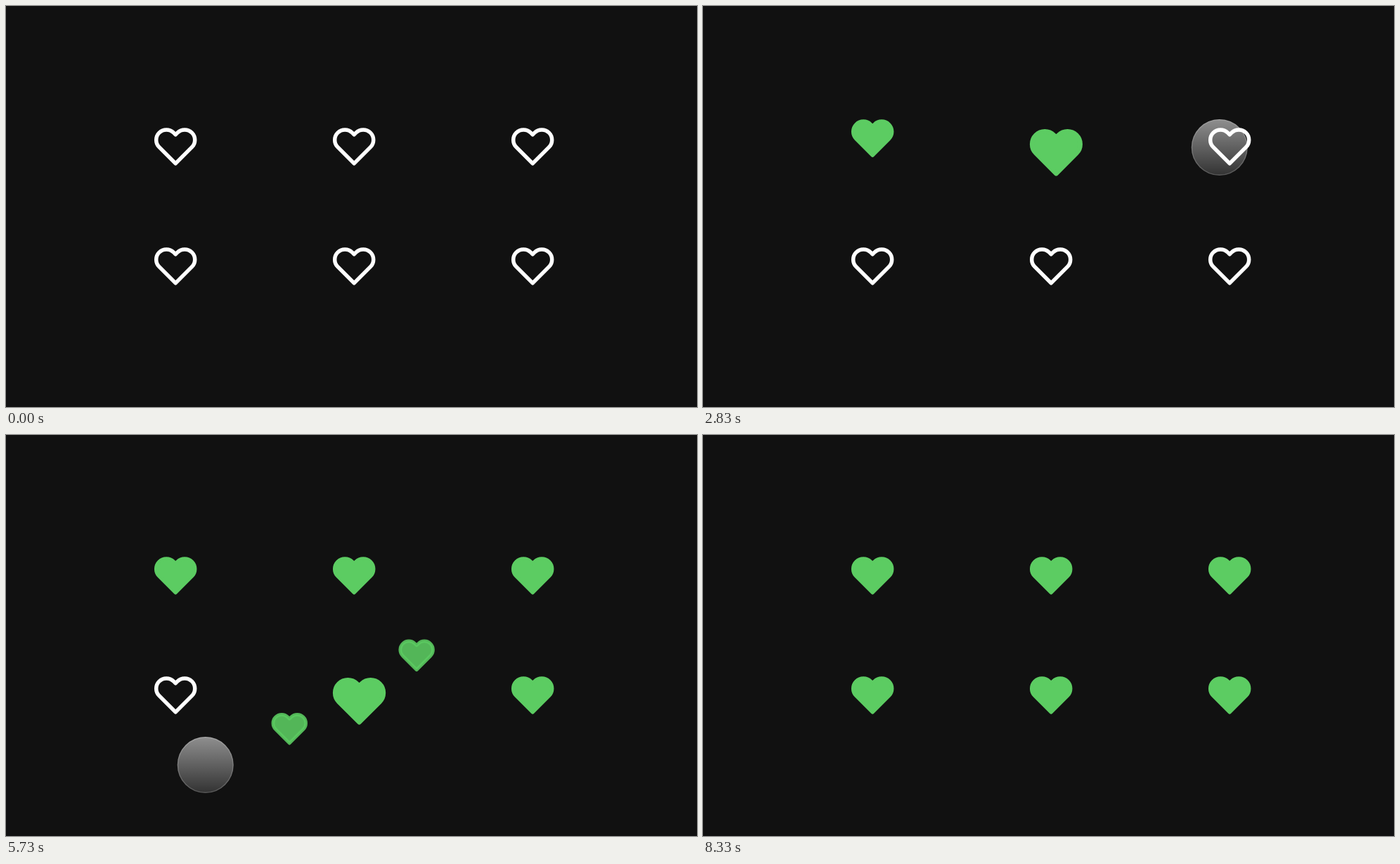
An HTML page with a canvas that plays this animation: 983 px wide and 570 px high, repeating every 8360 ms.

```html
<!DOCTYPE html>
<html lang="en">
<head>
<meta charset="utf-8">
<title>Hearts</title>
<style>
  html, body { margin: 0; width: 100%; height: 100%; overflow: hidden; background: #111; }
  canvas { display: block; }
</style>
</head>
<body>
<canvas id="stage" width="983" height="570"></canvas>
<script>
const ctx = document.getElementById('stage').getContext('2d');
const LOOP = 8360;
const FADE = 400;
const GREEN = [92, 204, 98];
const LOBE = 14.5;
const STROKE = 5.5;
// Transforms pivot on the top left corner of each heart's box.
const PIVOT = { x: -30, y: -35 };

// Two round lobes joined by 45 degree lines.
const heartPath = new Path2D();
heartPath.arc(-13, -10, LOBE, Math.PI * 0.75, Math.PI * 1.75);
heartPath.lineTo(0, -17.5);
heartPath.arc(13, -10, LOBE, Math.PI * 1.25, Math.PI * 0.25);
heartPath.lineTo(0, 23.5);
heartPath.closePath();

const clamp = v => Math.min(1, Math.max(0, v));
const rad = deg => deg * Math.PI / 180;
const glide = p => p < 0.5 ? 4 * p ** 3 : 1 - 4 * (1 - p) ** 3;
const curve = (a, b, c, u) => (1 - u) ** 2 * a + 2 * u * (1 - u) * b + u * u * c;

// The CSS "ease" curve, cubic-bezier(.25, .1, .25, 1).
function ease(p) {
  const bezier = (b, c, u) => 3 * (1 - u) ** 2 * u * b + 3 * (1 - u) * u * u * c + u ** 3;
  let lo = 0, hi = 1;
  for (let i = 0; i < 20; i++) {
    const mid = (lo + hi) / 2;
    if (bezier(0.25, 0.25, mid) < clamp(p)) lo = mid; else hi = mid;
  }
  return bezier(0.1, 1, lo);
}

// Out and back, each half eased.
const swing = (age, half = 1000) => age < half ? ease(age / half) : 1 - ease(age / half - 1);

const grow = k => ctx.scale(k, k);
const hop = age => ctx.translate(0, -30 * swing(age));
const swell = age => grow(1 + 0.3 * swing(age));
const tilt = age => ctx.rotate(rad(30 * swing(age)));
const split = age => grow(1 + 0.365 * swing(age));
const skew = age => ctx.transform(1, 0, Math.tan(rad(20 * swing(age, 700))), 1, 0, 0);
function flip(age) {
  const angle = rad(360 * ease(age / 1000));
  ctx.scale(1 - 0.035 * Math.sin(angle), Math.cos(angle));
}

// In tap order: along the top row, then back along the bottom one.
// After each tap the pointer travels on; bend moves the curve's handle off its end.
const hearts = [
  { tap: 1480, move: hop, travel: 570, bend: [-127, -72] },
  { tap: 2330, move: swell, travel: 650, bend: [-127, -44] },
  { tap: 3300, move: tilt, travel: 1200, bend: [105, 130] },
  { tap: 4534, move: flip, travel: 572, bend: [0, 193] },
  { tap: 5340, move: split, travel: 740, bend: [0, 193] },
  { tap: 6750, move: skew, travel: 1150, bend: [0, 378] }
];
hearts.forEach((heart, i) => {
  heart.x = 241.2 + 254 * (i < 3 ? i : 5 - i);
  heart.y = i < 3 ? 200.4 : 370.4;
});

const entry = { tap: 570, travel: 750, bend: [200, 0], at: [794, 285] };
const exit = { at: [83, 212] };
const stops = [entry, ...hearts.map(h => ({ ...h, at: [h.x - 2.2, h.y + 4.6] })), exit];

function paintHeart(fillAlpha, strokeColor) {
  ctx.lineWidth = STROKE;
  ctx.lineJoin = 'round';
  ctx.fillStyle = `rgba(${GREEN},${fillAlpha})`;
  ctx.strokeStyle = strokeColor;
  ctx.fill(heartPath);
  ctx.stroke(heartPath);
}

function drawTwins(age) {
  const reach = 156 * swing(age);
  const alpha = ease((age - 150) / FADE);
  for (const side of [-1, 1]) {
    ctx.save();
    ctx.translate(493.7 + side * reach * Math.cos(rad(30)), 366 - side * reach * Math.sin(rad(30)));
    grow(0.85);
    paintHeart(alpha, `rgba(${GREEN},${alpha})`);
    ctx.restore();
  }
}

function drawHeart(heart, t) {
  const age = t - heart.tap;
  const mix = ease(age / FADE);
  if (heart.move === split && age > 0 && age < 2000) drawTwins(age);
  ctx.save();
  ctx.translate(heart.x + PIVOT.x, heart.y + PIVOT.y);
  if (age > 0) heart.move(age);
  ctx.translate(-PIVOT.x, -PIVOT.y);
  paintHeart(mix, `rgb(${GREEN.map(c => 255 + (c - 255) * mix)})`);
  ctx.restore();
}

function disc(radius) {
  ctx.beginPath();
  ctx.arc(0, 0, radius, 0, 2 * Math.PI);
}

function drawPointer(t) {
  const alpha = clamp((t - entry.tap) / 230) * clamp((8150 - t) / 450);
  if (!alpha) return;
  const leg = stops.findLastIndex(stop => t >= stop.tap);
  const { tap, travel, bend, at } = stops[leg];
  const goal = stops[leg + 1].at;
  const u = glide(clamp((t - tap) / travel));
  const [x, y] = goal.map((end, i) => curve(at[i], end + bend[i], end, u));
  ctx.save();
  ctx.translate(x, y);
  ctx.globalAlpha = alpha;
  const shade = ctx.createLinearGradient(0, -40, 0, 40);
  shade.addColorStop(0, 'rgba(255,255,255,.53)');
  shade.addColorStop(1, 'rgba(255,255,255,.14)');
  ctx.fillStyle = shade;
  disc(40);
  ctx.fill();
  ctx.lineWidth = 1.4;
  ctx.strokeStyle = 'rgba(255,255,255,.18)';
  disc(39.3);
  ctx.stroke();
  ctx.restore();
}

const begin = performance.now();

function draw() {
  const t = (performance.now() - begin) % LOOP;
  ctx.fillStyle = '#111';
  ctx.fillRect(0, 0, 983, 570);
  // An untapped heart stays crisp above the pointer.
  for (const heart of hearts) if (t >= heart.tap) drawHeart(heart, t);
  drawPointer(t);
  for (const heart of hearts) if (t < heart.tap) drawHeart(heart, t);
  requestAnimationFrame(draw);
}
draw();
</script>
</body>
</html>
```
